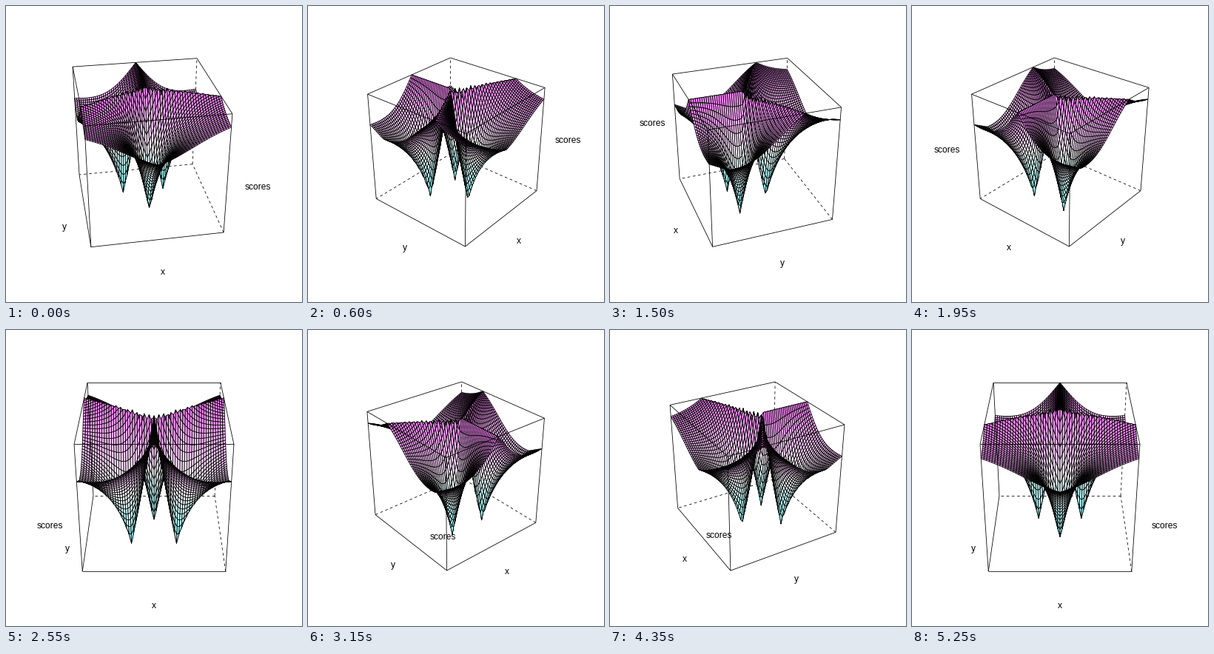
A matplotlib script that plays this animation: 400x400 px, repeating every 5400 ms.

```python
import numpy as np
import matplotlib.pyplot as plt
from matplotlib.animation import FuncAnimation
from matplotlib.collections import LineCollection, PolyCollection

SIZE, FRAMES, INTERVAL = 400, 36, 150
TILT = np.radians(-60)
EYE = 5.0            # viewer distance in box units
BOX_PX = 255         # projected box height in pixels
LABEL_PUSH = 1.338
PX = 0.72            # points per pixel at 100 dpi

# Box corners: bottom ring, then top ring
RING = [(-.5, -.5), (.5, -.5), (.5, .5), (-.5, .5)]
CORNERS = np.array([(x, y, z) for z in (-.5, .5) for x, y in RING])
EDGES = ([(i, (i + 1) % 4) for i in range(4)]
         + [(4 + i, 4 + (i + 1) % 4) for i in range(4)]
         + [(i, i + 4) for i in range(4)])


def score(x, y):
    """One minus the gap between the two nearest sites, over the distance sum."""
    sites = [(-1, 1), (1, 1), (0, 1 - np.sqrt(3))]
    d = np.sort([np.hypot(x - a, y - b) for a, b in sites], axis=0)
    return 1 - 2 * (d[1] - d[0]) / d.sum(axis=0)


def cyan_magenta(t):
    """Cyan to white to magenta for t in 0..1."""
    s = np.abs(t - .5)
    low = t < .5
    one = np.ones_like(t)
    return np.stack([np.where(low, 1 - s, one),
                     np.where(low, one, 1 - s), one], axis=-1)


def quads(a):
    return np.stack([a[:-1, :-1], a[1:, :-1], a[1:, 1:], a[:-1, 1:]],
                    axis=2).reshape(-1, 4, a.shape[-1])


axis = np.linspace(-3, 3, 61)
gx, gy = np.meshgrid(axis, axis, indexing="ij")
gz = score(gx, gy)
gz = (gz - gz.min()) / (gz.max() - gz.min()) - .5
surface = np.stack([gx / 6, gy / 6, gz], axis=-1)
level = quads(surface)[..., 2].mean(axis=1) + .5
colors = cyan_magenta((np.floor(level * 70) + .5) / 71)


def rotate(p, deg):
    a = np.radians(deg)
    x, y, z = np.moveaxis(np.asarray(p, float), -1, 0)
    x, y = x * np.cos(a) - y * np.sin(a), x * np.sin(a) + y * np.cos(a)
    y, z = (y * np.cos(TILT) - z * np.sin(TILT),
            y * np.sin(TILT) + z * np.cos(TILT))
    return np.stack([x, y, z], axis=-1)


def project(p):
    return p[..., :2] / (EYE - p[..., 2:])


fig = plt.figure(figsize=(SIZE / 100, SIZE / 100), dpi=100, facecolor="white")
ax = fig.add_axes([0, 0, 1, 1])
ax.set_xlim(0, SIZE)
ax.set_ylim(SIZE, 0)
ax.axis("off")

thin = dict(colors="black", linewidths=.8 * PX)
back = LineCollection([], linestyles=[(0, (4.5, 4.5))], zorder=1, **thin)
front = LineCollection([], zorder=3, **thin)
mesh = PolyCollection([], edgecolors="black", linewidths=.8 * PX, zorder=2)
for c in (back, mesh, front):
    ax.add_collection(c, autolim=False)
labels = [ax.text(0, 0, s, family="Liberation Sans", size=12 * PX,
                  ha="center", va="baseline", zorder=4)
          for s in ("x", "y", "scores")]


def draw(i):
    deg = 10 * (i + 1)
    box = rotate(CORNERS, deg)
    flat = project(box)
    lo, hi = flat.min(axis=0), flat.max(axis=0)
    scale = BOX_PX / (hi[1] - lo[1])
    mid = 1.25 * (lo + hi) / 2

    def screen(p):
        return (project(p) - mid) * scale * [1, -1] + [200, 199.8]

    far = int(np.argmin(np.round(box[:, 2], 9)))
    pts = screen(box)
    hidden = [e for e in EDGES if far in e]
    back.set_segments([pts[list(e)] for e in hidden])
    front.set_segments([pts[list(e)] for e in EDGES if far not in e])

    turned = rotate(surface, deg)
    order = np.argsort(quads(turned)[..., 2].mean(axis=1), kind="stable")
    mesh.set_verts(quads(screen(turned))[order])
    mesh.set_facecolor(colors[order])

    fx, fy, _ = CORNERS[far]
    spots = np.array([(0, -fy, -.5), (-fx, 0, -.5), (.5, -fy, 0)])
    for t, (x, y) in zip(labels, screen(rotate(spots * LABEL_PUSH, deg))):
        t.set_position((x, y + 3.3))
    return [back, mesh, front, *labels]


anim = FuncAnimation(fig, draw, frames=FRAMES, interval=INTERVAL,
                     repeat=True, repeat_delay=0, blit=False)
plt.show()
```
